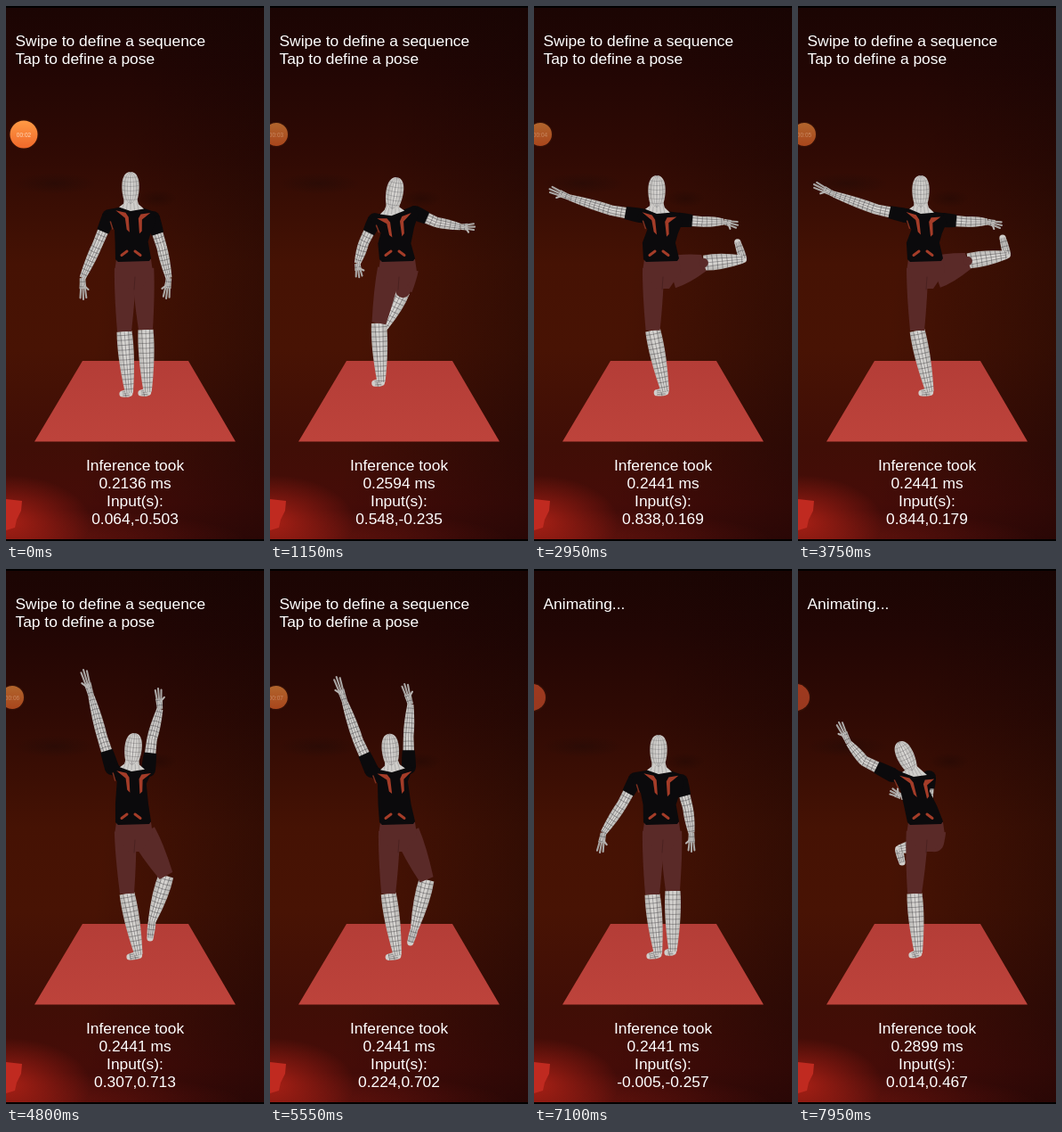
Animation, 290 px wide and 600 px high, one loop 8000 ms. Source, as an HTML page with a canvas:

```html
<!DOCTYPE html>
<html lang="en">
<head>
<meta charset="utf-8">
<title>Pose explorer</title>
<style>
  html, body { margin: 0; width: 100%; height: 100%; overflow: hidden; background: #120302; }
  #stage {
    position: relative; width: 290px; height: 600px; overflow: hidden;
    background:
      linear-gradient(#000 2px, transparent 2px 598px, #000 598px),
      radial-gradient(ellipse 46px 12px at 55px 199px, rgba(24,10,8,.35), transparent),
      radial-gradient(ellipse 22px 10px at 170px 216px, rgba(24,6,4,.35), transparent),
      radial-gradient(ellipse 95px 52px at 0 578px, rgba(190,36,24,.8), transparent),
      radial-gradient(ellipse 240px 36px at 30px 600px, rgba(150,30,20,.45), transparent),
      linear-gradient(97deg, transparent 40%, rgba(18,4,3,.45)),
      linear-gradient(#1b0503, #220604 12%, #300a04 28%, #451204 48%, #481304 64%, #400e06 82%, #460c08 93%, #3c0a08);
  }
  canvas { position: absolute; left: 0; top: 0; width: 290px; height: 600px; }
  .text {
    position: absolute; color: #fff; white-space: pre;
    font: 17.4px/20px "Liberation Sans", Arial, sans-serif;
  }
  #title { left: 10.5px; top: 29px; }
  #info { left: 0; width: 290px; top: 505px; text-align: center; }
</style>
</head>
<body>
<div id="stage">
  <canvas id="view"></canvas>
  <div class="text" id="title"></div>
  <div class="text" id="info"></div>
</div>
<script>
const LOOP = 8000;
const canvas = document.getElementById('view');
const titleEl = document.getElementById('title');
const infoEl = document.getElementById('info');
const dpr = window.devicePixelRatio || 1;
canvas.width = 290 * dpr;
canvas.height = 600 * dpr;
const g = canvas.getContext('2d');

// Each joint hangs from its parent; waist and hips stay put.
const parent = {
  neck: 'waist', head: 'neck',
  shL: 'neck', elL: 'shL', wrL: 'elL', tipL: 'wrL',
  shR: 'neck', elR: 'shR', wrR: 'elR', tipR: 'wrR',
  knL: 'hipL', anL: 'knL', toeL: 'anL',
  knR: 'hipR', anR: 'knR', toeR: 'anR'
};
const fixed = { waist: [144, 285], hipL: [134, 294], hipR: [154, 294] };

const stand = {
  neck: [140, 226], head: [140, 204],
  shL: [116, 236], elL: [103, 267], wrL: [86, 305], tipL: [87, 329],
  shR: [165, 238], elR: [175, 270], wrR: [183, 305], tipR: [180, 328],
  knL: [133, 365], anL: [138, 428], toeL: [131, 435],
  knR: [157, 363], anR: [159, 427], toeR: [152, 434]
};
const kick = {
  neck: [136, 232], head: [140, 211],
  shL: [118, 241], elL: [106, 265], wrL: [100, 286], tipL: [102, 300],
  shR: [162, 231], elR: [187, 238], wrR: [213, 238], tipR: [227, 234],
  knL: [121, 354], anL: [123, 414], toeL: [116, 421],
  knR: [150, 312], anR: [131, 343], toeR: [126, 348]
};
const balance = {
  neck: [138, 229], head: [138, 208],
  shL: [121, 235], elL: [88, 228], wrL: [40, 211], tipL: [18, 200],
  shR: [163, 240], elR: [190, 242], wrR: [213, 242], tipR: [229, 246],
  knL: [134, 364], anL: [147, 427], toeL: [139, 434],
  knR: [191, 286], anR: [229, 280], toeR: [230, 260]
};
const reach = {
  neck: [141, 223], head: [143, 202],
  shL: [119, 223], elL: [108, 188], wrL: [96, 143], tipL: [87, 113],
  shR: [160, 225], elR: [164, 191], wrR: [173, 157], tipR: [171, 134],
  knL: [136, 364], anL: [148, 427], toeL: [139, 435],
  knR: [180, 344], anR: [166, 389], toeR: [162, 414]
};
const bend = {
  neck: [121, 231], head: [105, 215],
  shL: [98, 243], elL: [68, 221], wrL: [45, 190], tipL: [33, 166],
  shR: [132, 215], elR: [114, 186], wrR: [86, 157], tipR: [62, 146],
  knL: [121, 363], anL: [119, 427], toeL: [109, 434],
  knR: [153, 363], anR: [153, 427], toeR: [146, 434]
};
const rest = {
  ...stand, shL: [114, 236], elL: [99, 264], wrL: [78, 296], tipL: [74, 318],
  elR: [173, 268], wrR: [177, 296], tipR: [177, 317],
  anL: [139, 426], toeL: [130, 434], knR: [156, 361], anR: [156, 423], toeR: [150, 430]
};
const lift = {
  neck: [130, 229], head: [121, 210],
  shL: [106, 231], elL: [74, 215], wrL: [57, 195], tipL: [46, 172],
  shR: [147, 234], elR: [146, 256], wrR: [116, 255], tipR: [104, 249],
  knL: [131, 364], anL: [135, 425], toeL: [128, 433],
  knR: [153, 306], anR: [119, 313], toeR: [117, 329]
};

const smooth = k => k * k * (3 - 2 * k);
const easeOut = k => 1 - (1 - k) ** 2;
const settle = k => 1 - (1 - k) ** 4;
const steps = [
  { from: 0, to: 0, pose: stand, input: [0.064, -0.503] },
  { from: 50, to: 1800, pose: kick, input: [0.625, -0.192], ease: easeOut },
  { from: 2150, to: 3500, pose: balance, input: [0.844, 0.179], ease: settle },
  { from: 4400, to: 4800, pose: reach, input: [0.307, 0.713] },
  { from: 5300, to: 6200, pose: bend, input: [-0.131, 0.656] },
  { from: 6500, to: 7080, pose: rest, input: [-0.005, -0.257] },
  { from: 7100, to: 7950, pose: lift, input: [0.014, 0.467] }
];
const tookAt = [[0, '0.2136'], [950, '0.2594'], [2500, '0.2441'], [7400, '0.2899']];

const mix = (a, b, k) => a + (b - a) * k;
const clamp = v => Math.max(0, Math.min(1, v));
const along = (a, b, k) => [mix(a[0], b[0], k), mix(a[1], b[1], k)];
const unit = (a, b) => {
  const d = Math.hypot(b[0] - a[0], b[1] - a[1]) || 1;
  return [(b[0] - a[0]) / d, (b[1] - a[1]) / d];
};

function polar(pose, name) {
  const p = pose[name], q = pose[parent[name]] || fixed[parent[name]];
  return [Math.atan2(p[1] - q[1], p[0] - q[0]), Math.hypot(p[0] - q[0], p[1] - q[1])];
}

// Turns each bone along the shorter arc.
function blend(a, b, k) {
  const out = { ...fixed };
  for (const name in parent) {
    const [a0, l0] = polar(a, name), [a1, l1] = polar(b, name);
    const turn = Math.atan2(Math.sin(a1 - a0), Math.cos(a1 - a0));
    const ang = a0 + turn * k, len = mix(l0, l1, k), o = out[parent[name]];
    out[name] = [o[0] + Math.cos(ang) * len, o[1] + Math.sin(ang) * len];
  }
  return out;
}

function poly(pts, fill) {
  g.beginPath();
  pts.forEach(p => g.lineTo(p[0], p[1]));
  g.closePath();
  g.fillStyle = fill;
  g.fill();
}
function dot(p, r, fill) {
  g.beginPath();
  g.arc(p[0], p[1], r, 0, 7);
  g.fillStyle = fill;
  g.fill();
}
function line(a, b, w, color) {
  g.beginPath();
  g.moveTo(a[0], a[1]);
  g.lineTo(b[0], b[1]);
  g.lineWidth = w;
  g.strokeStyle = color;
  g.stroke();
}

const SKIN = '#d0cecb', MESH = 'rgba(45,42,46,.6)', FINE = 'rgba(60,58,62,.45)';
const SHIRT = '#0b0a0c', PANTS = '#5a2a28', MARK = '#a43c28';

function skinShade(half) {
  const shade = g.createLinearGradient(0, -half, 0, half);
  shade.addColorStop(0, '#b8b6b3');
  shade.addColorStop(.5, '#dddbd8');
  shade.addColorStop(1, '#b8b6b3');
  return shade;
}

// Tapered limb from a to b, with wire mesh unless a plain fill is given.
function limb(a, b, wa, wb, bulge, fill) {
  const len = Math.hypot(b[0] - a[0], b[1] - a[1]);
  g.save();
  g.translate(a[0], a[1]);
  g.rotate(Math.atan2(b[1] - a[1], b[0] - a[0]));
  g.beginPath();
  g.moveTo(0, -wa / 2);
  g.quadraticCurveTo(len * .4, -wa / 2 - bulge, len, -wb / 2);
  g.lineTo(len, wb / 2);
  g.quadraticCurveTo(len * .4, wa / 2 + bulge, 0, wa / 2);
  g.closePath();
  g.fillStyle = fill || skinShade(wa / 2);
  g.fill();
  if (!fill) {
    g.clip();
    for (let x = 3; x < len; x += 5.5) {
      g.beginPath();
      g.moveTo(x, -wa);
      g.quadraticCurveTo(x + 3, 0, x, wa);
      g.lineWidth = .6;
      g.strokeStyle = MESH;
      g.stroke();
    }
    for (const s of [-.27, 0, .27]) line([0, wa * s], [len, wb * s], .6, MESH);
  }
  g.restore();
}

function hand(wr, tip, side) {
  const d = unit(wr, tip), n = [-d[1] * side, d[0] * side];
  const palm = along(wr, tip, .5);
  limb(wr, palm, 6.5, 8, 0);
  const span = Math.hypot(tip[0] - palm[0], tip[1] - palm[1]);
  for (let i = -1; i < 2; i++) {
    const base = [palm[0] + n[0] * i * 2.4, palm[1] + n[1] * i * 2.4];
    const l = span * (1 - Math.abs(i) * .15);
    line(base, [base[0] + d[0] * l + n[0] * i, base[1] + d[1] * l + n[1] * i], 2.1, '#a9a6a4');
  }
  const root = along(wr, tip, .3), l = span * .5;
  line(root, [root[0] + d[0] * l + n[0] * 6, root[1] + d[1] * l + n[1] * 6], 2.1, '#b5b2b0');
}

function arm(sh, el, wr, tip, side) {
  hand(wr, tip, side);
  dot(el, 5.5, SKIN);
  limb(el, wr, 11.5, 7, .8);
  limb(along(sh, el, .4), el, 12.5, 11.5, 0);
  dot(sh, 8, SHIRT);
  limb(sh, along(sh, el, .55), 16, 14, 0, SHIRT);
}

function shin(kn, an, toe) {
  const d = unit(kn, an);
  const heel = [an[0] + d[0] * 6, an[1] + d[1] * 6];
  dot(an, 5, SKIN);
  dot(heel, 4, SKIN);
  dot(toe, 3.6, SKIN);
  limb(heel, toe, 8.5, 7, .8);
  limb(kn, heel, 17, 9, 2);
}

// A raised thigh shows more of the seat, so its root grows and sinks.
function thigh(hip, kn) {
  const len = Math.hypot(kn[0] - hip[0], kn[1] - hip[1]);
  const raise = Math.abs(kn[0] - hip[0]) / Math.max(len, 30);
  const w = 24 - 8 * Math.min(1, len / 60);
  limb([hip[0], hip[1] + 5 * raise], kn, 24 + 12 * raise, w, 0, PANTS);
  dot(kn, w / 2 * clamp((1 - len / 60) * 1.4), PANTS);
}

function torso(p) {
  const u = unit(p.shL, p.shR), n = unit(p.neck, p.waist);
  const at = (o, x, y) => [o[0] + u[0] * x + n[0] * y, o[1] + u[1] * x + n[1] * y];
  const mid = along(p.waist, p.neck, .35);
  poly([
    at(p.neck, -11, 0), at(p.shL, 0, -8), at(p.shL, -5, 2), at(p.shL, 5, 15),
    [mid[0] - 20, mid[1]], [123, 284], [126, 287], [161, 286], [163, 283],
    [mid[0] + 17, mid[1]], at(p.shR, -3, 16), at(p.shR, 4, 2), at(p.shR, 0, -8), at(p.neck, 14, 0)
  ], SHIRT);
  const mark = [[-17, 4], [-6, 6], [-3, 11], [-3, 28], [-6, 25], [-7, 12], [-12, 8]];
  poly(mark.map(([x, y]) => at(p.neck, x, y)), MARK);
  poly(mark.map(([x, y]) => at(p.neck, 5 - x, y + 1)), MARK);
  line([130, 279.5], [136, 275], 3, MARK);
  line([145, 275], [151, 279.5], 3, MARK);
  line(at(p.shL, 1, 6), at(p.shL, 3, 14), 1.5, '#7d3020');
}

function head(p) {
  const u = unit(p.shL, p.shR);
  const at = (o, x, y) => [o[0] + u[0] * x, o[1] + u[1] * x + y];
  const mid = along(p.neck, p.head, .5);
  poly([at(mid, -7, 0), at(p.neck, -8, -4), at(p.neck, -13, 0), at(p.neck, 0, 4),
    at(p.neck, 15, 1), at(p.neck, 9, -4), at(mid, 7, 0)], SKIN);
  for (let i = -2; i < 3; i++) line(at(mid, i * 3, 0), at(p.neck, i * 4.5, 2), .5, FINE);

  g.save();
  g.translate(p.head[0], p.head[1]);
  g.rotate(Math.atan2(p.neck[1] - p.head[1], p.neck[0] - p.head[0]));
  g.beginPath();
  g.moveTo(-18, 0);
  g.bezierCurveTo(-18, 12, 4, 11, 15, 7);
  g.quadraticCurveTo(20, 0, 15, -7);
  g.bezierCurveTo(4, -11, -18, -12, -18, 0);
  g.fillStyle = skinShade(10);
  g.fill();
  g.clip();
  g.lineWidth = .5;
  g.strokeStyle = FINE;
  for (const ry of [.1, 3.4, 6.8]) {
    g.beginPath();
    g.ellipse(0, 0, 18, ry, 0, 0, 7);
    g.stroke();
  }
  for (let x = -13; x < 18; x += 5) {
    g.beginPath();
    g.moveTo(x, -11);
    g.quadraticCurveTo(x + 3, 0, x, 11);
    g.stroke();
  }
  g.restore();
}

function figure(p) {
  g.lineCap = 'round';
  arm(p.shL, p.elL, p.wrL, p.tipL, -1);
  arm(p.shR, p.elR, p.wrR, p.tipR, 1);
  shin(p.knR, p.anR, p.toeR);
  shin(p.knL, p.anL, p.toeL);
  thigh(p.hipL, p.knL);
  thigh(p.hipR, p.knR);
  poly([[124, 284], [163, 284], [165, 298], [152, 317], [138, 317], [122, 298]], PANTS);
  line([145, 304], [144, 318], .8, 'rgba(35,12,12,.35)');
  torso(p);
  head(p);
}

function recorder(t) {
  const dock = smooth(clamp((t - 250) / 550)), tuck = smooth(clamp((t - 5500) / 500));
  const x = 20 - 13 * dock - 9 * tuck, r = 15.5 - 2.5 * dock + 2 * tuck;
  g.save();
  dot([x, 144], r + 1.5, 'rgba(60,22,10,.5)');
  g.globalAlpha = 1 - .38 * dock;
  const fill = g.createLinearGradient(0, 144 - r, 0, 144 + r);
  fill.addColorStop(0, tuck > .5 ? '#e0542f' : '#ff9a45');
  fill.addColorStop(1, tuck > .5 ? '#d8532e' : '#f0682a');
  dot([x, 144], r, fill);
  g.globalAlpha = (.85 - .5 * dock) * (1 - tuck);
  g.fillStyle = '#ffe6d0';
  g.font = '6.5px "Liberation Sans", Arial, sans-serif';
  g.textAlign = 'center';
  g.fillText('00:0' + (2 + Math.floor(t / 1000)), x, 147);
  g.restore();
}

function room() {
  poly([[0, 553], [18, 555], [17, 566], [12, 576], [10, 585], [0, 588]], '#c02a20');
  const floor = g.createLinearGradient(0, 398, 0, 488);
  floor.addColorStop(0, '#b43d37');
  floor.addColorStop(1, '#bd433b');
  poly([[86, 398], [205, 398], [258, 488.5], [32, 488.5]], floor);
}

function setText(el, s) {
  if (el.textContent !== s) el.textContent = s;
}

function draw(t) {
  let i = 0;
  while (i + 1 < steps.length && t >= steps[i + 1].from) i++;
  const step = steps[i], prev = steps[Math.max(0, i - 1)];
  const k = i ? (step.ease || smooth)(clamp((t - step.from) / (step.to - step.from))) : 1;

  g.setTransform(dpr, 0, 0, dpr, 0, 0);
  g.clearRect(0, 0, 290, 600);
  room();
  figure(blend(prev.pose, step.pose, k));
  recorder(t);

  const [x, y] = along(prev.input, step.input, k);
  const took = tookAt.filter(e => t >= e[0]).pop()[1];
  setText(titleEl, t < 6900 ? 'Swipe to define a sequence\nTap to define a pose' : 'Animating...');
  setText(infoEl, `Inference took\n${took} ms\nInput(s):\n${x.toFixed(3)},${y.toFixed(3)}`);
}

const start = performance.now();
function tick() {
  draw((performance.now() - start) % LOOP);
  requestAnimationFrame(tick);
}
tick();
</script>
</body>
</html>
```
